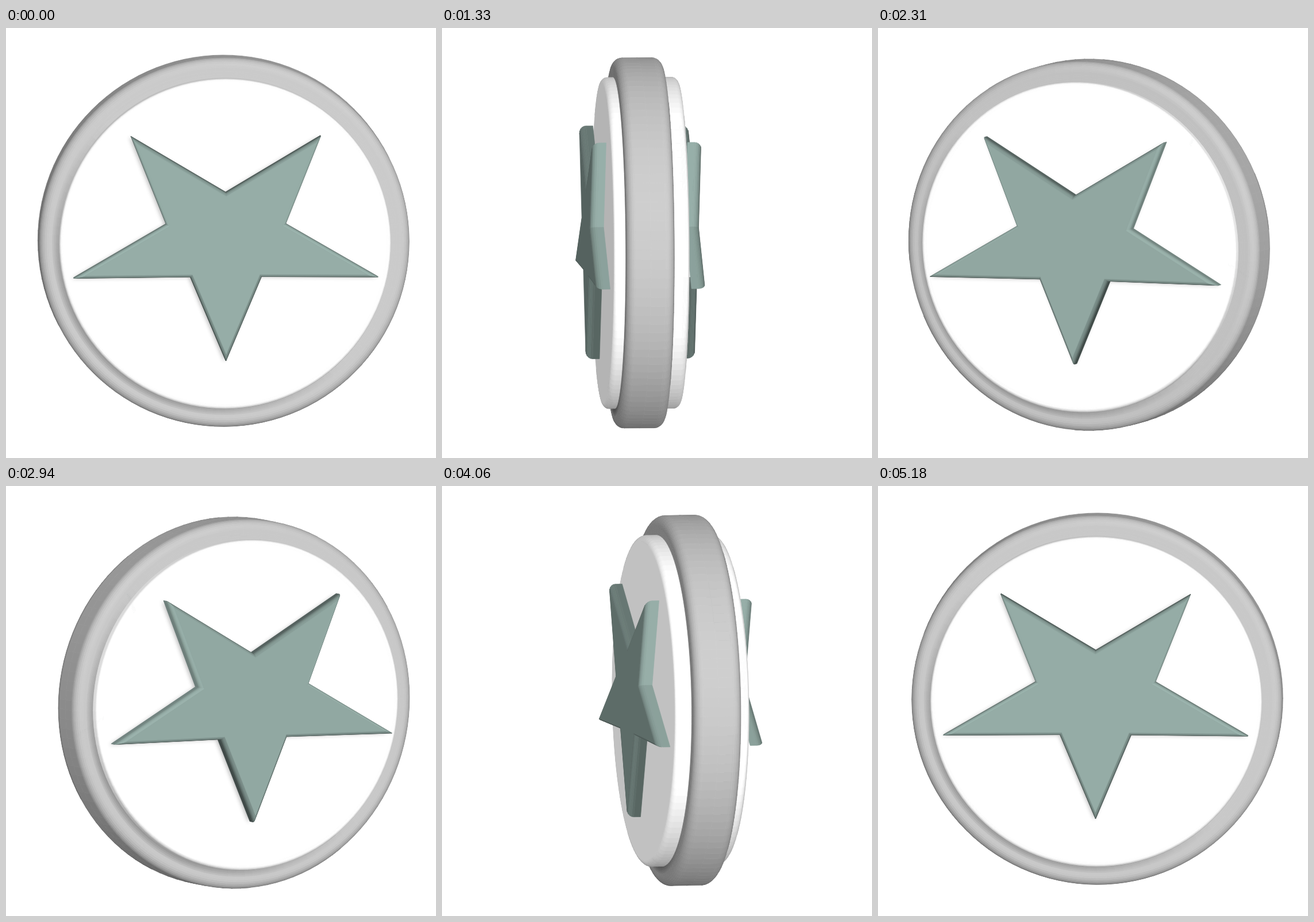
These frames come from a looping animation (748 px wide and 748 px high, 5250 ms). An HTML page with a canvas:

```html
<!DOCTYPE html>
<html lang="en">
<head>
<meta charset="utf-8">
<title>Spinning star medallion</title>
<style>
html, body { margin: 0; width: 100%; height: 100%; overflow: hidden; background: #fff; }
canvas { display: block; }
</style>
</head>
<body>
<canvas id="stage" width="748" height="748"></canvas>
<script>
const ctx = document.getElementById('stage').getContext('2d');
const STEPS = 75, STEP_MS = 70, START = 2.8 * Math.PI / 180;
const CX = 380.2, CY = 373.6, AXIS_SHIFT = -35.5;  // the medallion sits behind its pivot
const SIN_E = 0.09, COS_E = Math.sqrt(1 - SIN_E * SIN_E); // camera looks slightly down
const SEGMENTS = 120;
const RIM = { r: 322, h: 42, round: 16 };
const RIM_SHIFT = -4;                              // the rim is not quite centred between the discs
const DISC = { r: 288, h: 66, round: 10 };
const STAR_BASE = 71, STAR_TOP = 95;

let sin = 0, cos = 1;

const clamp = (v, a, b) => Math.max(a, Math.min(b, v));

function rotate(x, y, z) {
  return [x * cos + z * sin, y, z * cos - x * sin];
}

// Screen x, screen y and depth towards the viewer
function project(x, y, z, side) {
  const p = rotate(x * side, y, z * side + AXIS_SHIFT);
  return [CX + p[0], CY + p[1] * COS_E + p[2] * SIN_E, p[2] * COS_E - p[1] * SIN_E];
}

// View-space normal
function facing(x, y, z, side) {
  const n = rotate(x * side, y, z * side);
  return [n[0], n[1] * COS_E + n[2] * SIN_E, n[2] * COS_E - n[1] * SIN_E];
}

function trace(pts) {
  ctx.beginPath();
  pts.forEach(p => ctx.lineTo(p[0], p[1]));
  ctx.closePath();
}

function fill(pts, color) {
  trace(pts);
  ctx.fillStyle = ctx.strokeStyle = color;
  ctx.lineWidth = 0.7;
  ctx.lineJoin = 'round';
  ctx.fill();
  ctx.stroke();
}

function gray(v) {
  v = Math.round(clamp(v, 0, 255));
  return `rgb(${v},${v},${v})`;
}

function teal(v) {
  return `rgb(${Math.round(v * 0.865)},${Math.round(v)},${Math.round(v * 0.965)})`;
}

const rimShade = n => 118 + 85 * n[2] + 15 * n[0] - 18 * n[1];
const discShade = n => 183 + 112 * n[2] + 11 * n[0] - 40 * Math.max(0, n[1]);
const starShade = n => 98 + 75 * n[2] + 5 * n[0];

function corner({ r, h, round }, steps) {
  const pts = [];
  for (let i = 0; i <= steps; i++) {
    const a = i / steps * Math.PI / 2;
    pts.push([r - round + round * Math.cos(a), h - round + round * Math.sin(a)]);
  }
  return pts;
}

const rimProfile = [[RIM.r, 0], ...corner(RIM, 7),
  [300, RIM.h], [297, RIM.h], [294, RIM.h], [291, RIM.h], [288, RIM.h], [282, RIM.h]];
const discCorner = corner(DISC, 7);

// Surface of revolution around the medallion's axis
function lathe(profile, side, shade) {
  for (let k = 0; k + 1 < profile.length; k++) {
    const [r0, z0] = profile[k], [r1, z1] = profile[k + 1];
    const len = Math.hypot(r1 - r0, z1 - z0);
    const nr = (z1 - z0) / len, nz = (r0 - r1) / len;
    for (let i = 0; i < SEGMENTS; i++) {
      const a = i / SEGMENTS * 2 * Math.PI, b = (i + 1) / SEGMENTS * 2 * Math.PI;
      const m = (a + b) / 2;
      const n = facing(nr * Math.cos(m), nr * Math.sin(m), nz, side);
      if (n[2] <= 0) continue;
      const at = (r, t, z) => project(r * Math.cos(t), r * Math.sin(t), z, side);
      fill([at(r0, a, z0), at(r0, b, z0), at(r1, b, z1), at(r1, a, z1)],
        gray(shade(n, (r0 + r1) / 2, Math.cos(m) * side, Math.sin(m))));
    }
  }
}

// The rim darkens in the groove beside the disc, mostly at the lower left
function rimColor(n, r, dx, dy) {
  const groove = clamp((302 - r) / 12, 0, 1) * clamp(0.75 * dy - 0.75 * dx * Math.sign(cos), 0, 1);
  return rimShade(n) - 48 * groove;
}

function rim(side) {
  lathe(rimProfile.map(([r, z]) => [r, z + RIM_SHIFT * side]), side, rimColor);
}

function disc(side) {
  lathe([[DISC.r, RIM.h + RIM_SHIFT * side], ...discCorner], side, discShade);
  const n = facing(0, 0, 1, side);
  if (n[2] <= 0) return;
  const pts = [], r = DISC.r - DISC.round;
  for (let i = 0; i < SEGMENTS; i++) {
    const a = i / SEGMENTS * 2 * Math.PI;
    pts.push(project(r * Math.cos(a), r * Math.sin(a), DISC.h, side));
  }
  fill(pts, gray(discShade(n)));
}

// Right half of the star from the top notch to the bottom tip, then mirrored
const half = [[0, -92], [165, -190], [104, -37], [265, 56.5], [62, 55], [0, 202]];
const outline = half.concat(half.slice(1, -1).reverse().map(([x, y]) => [-x, y]));
const SIDES = outline.length;
// How much light reaches each wall
const wallLight = [0.84, 1.06, 1.14, 0.72, 0.62, 0.62, 0.72, 1.14, 1.06, 0.84];

const edgeNormals = outline.map(([x, y], i) => {
  const [u, v] = outline[(i + 1) % SIDES], len = Math.hypot(u - x, v - y);
  return [(v - y) / len, (x - u) / len];
});

function inset(d) {
  return outline.map(([x, y], i) => {
    const p = edgeNormals[(i + SIDES - 1) % SIDES], q = edgeNormals[i];
    const k = d / (1 + p[0] * q[0] + p[1] * q[1]);
    return [x - (p[0] + q[0]) * k, y - (p[1] + q[1]) * k];
  });
}

const starLayers = [{ z: STAR_BASE, pts: outline }];
for (let i = 0; i <= 5; i++) {
  const a = i / 5 * Math.PI / 2;
  starLayers.push({ z: STAR_TOP - 12 + 12 * Math.sin(a), pts: inset(5 * (1 - Math.cos(a))) });
}

function starShadow(side) {
  ctx.save();
  ctx.shadowColor = 'rgba(60,60,60,0.3)';
  ctx.shadowBlur = 6;
  ctx.shadowOffsetX = -3;
  ctx.shadowOffsetY = 2;
  trace(outline.map(([x, y]) => project(x, y, STAR_BASE, side)));
  ctx.fillStyle = teal(120);
  ctx.fill();
  ctx.restore();
}

function star(side) {
  const cap = facing(0, 0, 1, side);
  if (cap[2] > 0.3) starShadow(side);
  const walls = [];
  for (let i = 0; i < SIDES; i++) {
    const j = (i + 1) % SIDES, [ex, ey] = edgeNormals[i];
    const mid = project((outline[i][0] + outline[j][0]) / 2, (outline[i][1] + outline[j][1]) / 2, 80, side);
    walls.push({ i, j, ex, ey, depth: mid[2] });
  }
  walls.sort((a, b) => a.depth - b.depth);
  for (const { i, j, ex, ey } of walls) {
    for (let k = 0; k + 1 < starLayers.length; k++) {
      const lo = starLayers[k], hi = starLayers[k + 1];
      const tilt = k ? (k - 0.5) / 5 * Math.PI / 2 : 0;
      const n = facing(ex * Math.cos(tilt), ey * Math.cos(tilt), Math.sin(tilt), side);
      if (n[2] <= 0) continue;
      const light = wallLight[i] + (1 - wallLight[i]) * Math.sin(tilt) * 0.6;
      const at = (layer, v) => project(layer.pts[v][0], layer.pts[v][1], layer.z, side);
      fill([at(lo, i), at(lo, j), at(hi, j), at(hi, i)], teal(starShade(n) * light));
    }
  }
  if (cap[2] > 0) {
    const top = starLayers[starLayers.length - 1];
    fill(top.pts.map(([x, y]) => project(x, y, top.z, side)), teal(starShade(cap)));
  }
}

function draw(step) {
  const angle = START + step / STEPS * 2 * Math.PI;
  sin = Math.sin(angle);
  cos = Math.cos(angle);
  ctx.fillStyle = '#fff';
  ctx.fillRect(0, 0, 748, 748);
  const near = cos >= 0 ? 1 : -1;
  star(-near);
  disc(-near);
  rim(-near);
  rim(near);
  disc(near);
  star(near);
}

let shown = -1;
const begin = performance.now();
function tick() {
  const step = Math.floor((performance.now() - begin) / STEP_MS) % STEPS;
  if (step !== shown) draw(shown = step);
  requestAnimationFrame(tick);
}
tick();
</script>
</body>
</html>
```
